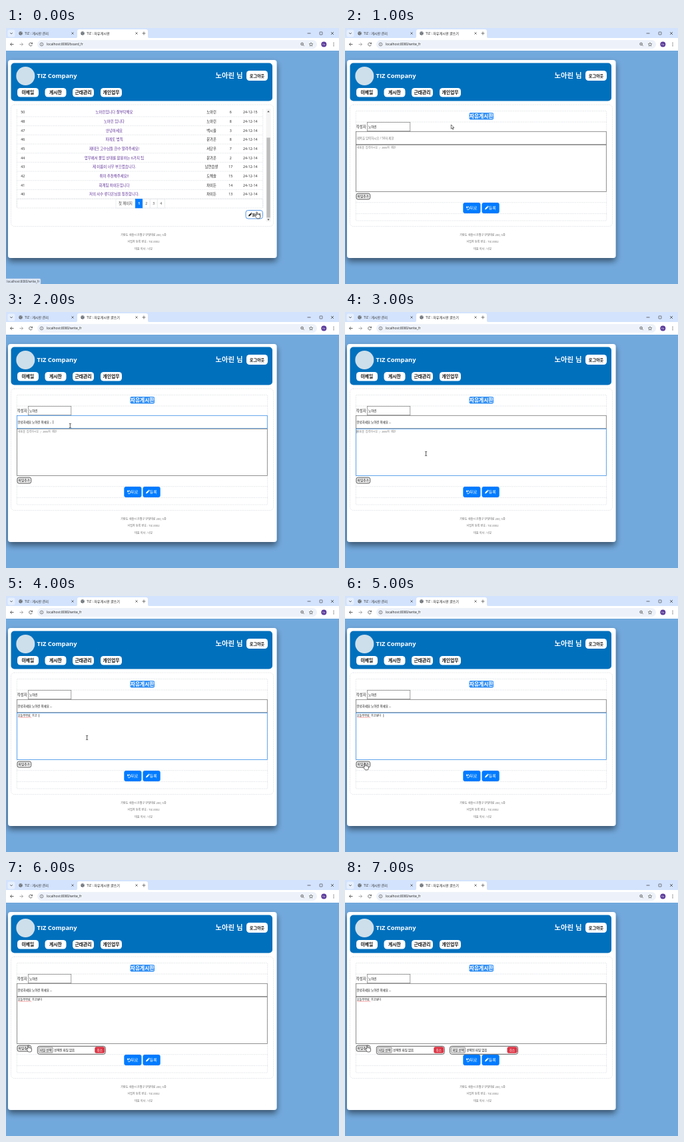
Animation, 500 px wide and 384 px high, one loop 8000 ms. Source, as an HTML page:

```html
<!DOCTYPE html>
<html>
<head>
<meta charset="utf-8">
<title>Board</title>
<style>
html, body { margin: 0; width: 100%; height: 100%; overflow: hidden; background: #72a9dd; }
svg { display: block; width: 500px; height: 384px; }
text { font-family: "Open Sans", "Noto Sans CJK KR", "Noto Sans CJK JP", sans-serif; white-space: pre; }
.mono { font-family: "Noto Sans Mono CJK KR", "Noto Sans CJK KR", "Noto Sans CJK JP", monospace; }
</style>
</head>
<body>
<svg id="stage" viewBox="0 0 500 384" xmlns="http://www.w3.org/2000/svg"></svg>
<script>
const BLUE = '#007bff', INK = '#222', LOOP = 8000;
const USER = '노아린', BRAND = 'TIZ';

const rect = (x, y, w, h, fill, r = 0, extra = '') =>
  `<rect x="${x}" y="${y}" width="${w}" height="${h}" rx="${r}" fill="${fill}" ${extra}/>`;
const line = (d, stroke = '#444', w = .7, extra = '') =>
  `<path d="${d}" fill="none" stroke="${stroke}" stroke-width="${w}" ${extra}/>`;
const circle = (x, y, r, fill, extra = '') =>
  `<circle cx="${x}" cy="${y}" r="${r}" fill="${fill}" ${extra}/>`;
// y is the vertical centre of the glyphs
const text = (x, y, size, str, fill = INK, anchor = 'start', extra = '') =>
  `<text x="${x}" y="${y + size * .37}" font-size="${size}" fill="${fill}" text-anchor="${anchor}" ${extra}>${str}</text>`;
const mid = (x, y, size, str, fill, extra) => text(x, y, size, str, fill, 'middle', extra);
const bold = 'font-weight="700"';
const border = (c, w = .7) => `stroke="${c}" stroke-width="${w}"`;
const group = (id, body) => `<g id="${id}">${body}</g>`;
const dashes = 'stroke-dasharray="1.6 1.1"';
const dashLine = (x1, x2, y) => line(`M${x1} ${y}H${x2}`, '#d2d6da', .6, dashes);
const dashBox = (x, y, w, h, r) => rect(x, y, w, h, 'none', r, border('#d2d6da', .6) + dashes);
const cross = (x, y, s, c = '#444') =>
  line(`M${x - s} ${y - s}l${2 * s} ${2 * s}m0 ${-2 * s}l${-2 * s} ${2 * s}`, c, .7);
const pencil = (x, y, c) =>
  `<path d="M${x} ${y + 5}l.5 -1.9 2.9 -2.9 1.5 1.5 -2.9 2.9zM${x + 3.8} ${y - .2}l.6 -.6 1.5 1.5 -.6 .6z" fill="${c}"/>`;
const globe = (x, y) => circle(x, y, 2.7, '#5f6368') +
  line(`M${x - 2} ${y - .9}q1.6 .2 1.8 1.4t1.6 1.4M${x + .3} ${y - 2.2}q-.2 1.4 1.7 1.5`, '#dfe8f7', .6);

function chrome() {
  return rect(0, 0, 500, 16, '#d3e3fd') +
    rect(2.5, 2.5, 11, 11, '#e6effd', 3) + line('M6.3 7.2l1.7 1.7 1.7 -1.7', '#333', .8) +
    `<path d="M104 15.5q3 0 3 -3V5q0 -3 3 -3H210q3 0 3 3v7.500q0 3 3 3z" fill="#fff"/>` +
    rect(0, 15, 500, 19, '#fff') +
    globe(22, 8) + globe(115, 8) +
    text(28, 8, 5.1, BRAND + ' : 게시판 관리', '#333') +
    group('tab', '') +
    cross(100, 8, 1.6) + cross(196, 8, 1.6) +
    line('M204.500 8h5m-2.500 -2.500v5', '#444', .7) +
    line('M452.500 8h5', '#333') + rect(471, 6, 4, 4, 'none', .4, border('#333', .6)) + cross(490, 8, 2, '#333') +
    line('M11.500 24.500h-5m2.300 -2.300l-2.300 2.300 2.300 2.300', '#444', .8) +
    line('M20.500 24.500h5m-2.300 -2.300l2.300 2.300 -2.300 2.300', '#999', .8) +
    line('M39.200 23.300a2.400 2.400 0 1 0 .1 2.200M39.500 21.800v1.900h-1.900', '#444', .8) +
    rect(47, 18, 420, 13, '#edf2fa', 6.5) +
    circle(53.5, 24.5, 2.4, 'none', border('#444', .6)) + line('M53.500 24.200v1.500m0 -2.900v.6', '#444', .6) +
    group('url', '') +
    circle(444.6, 24, 1.9, 'none', border('#444', .7)) + line('M446 25.400l1.700 1.700M443.700 24h1.800', '#444', .7) +
    line('M458 21.800l.8 1.800 2 .2 -1.500 1.300 .4 2 -1.700 -1 -1.700 1 .4 -2 -1.500 -1.300 2 -.2z', '#444', .6) +
    circle(477.3, 24.5, 4, '#5c3c9c') + mid(477.3, 24.4, 3.4, 'Ha', '#eee') +
    [22.3, 24.5, 26.7].map(y => circle(492, y, .6, '#333')).join('');
}

function header() {
  const tabs = [['이메일', 17], ['게시판', 58.5], ['근태관리', 100], ['개인업무', 142]];
  return rect(3, 48, 403.5, 297, '#fff', 4, 'filter="url(#shade)"') +
    rect(7.5, 52.5, 392.5, 57, '#0070bd', 5) +
    circle(29.3, 72, 14, '#cddfea') +
    text(46.5, 72, 9.3, BRAND + ' Company', '#fff', 'start', bold) +
    text(314.5, 71.5, 10.4, USER + ' 님', '#fff', 'start', bold) +
    rect(361, 64, 32, 15, '#fff', 4.5) + mid(377, 71.5, 6.1, '로그아웃', '#111', bold) +
    tabs.map(([s, x]) => rect(x, 90, 32, 13.5, '#fff', 4.5) + mid(x + 16, 96.7, 6.8, s, '#111', bold)).join('') +
    dashBox(7.5, 115, 394, 182.5, 5) +
    mid(206.5, 310, 4.1, '가람도 새솔시 은별구 한빛대로 200, 5층', '#666') +
    mid(206.5, 320.7, 4.1, '사업자 등록 번호 : ' + BRAND + '-0002', '#666') +
    mid(206.5, 331.7, 4.1, '대표 이사 : 나모', '#666');
}

function board() {
  const rows = [
    [50, USER + '입니다 잘부탁해요', USER, 6],
    [48, USER + ' 입니다', USER, 8],
    [47, '안녕하세요', '백시율', 3],
    [46, '파레토 법칙', '문가온', 8],
    [45, '재테크 고수님들 한수 알려주세요!', '서단우', 7],
    [44, '업무에서 몰입 상태를 활용하는 6가지 팁', '문가온', 2],
    [43, '제 이름이 너무 부끄럽습니다.', '남연습생', 17],
    [42, '취미 추천해주세요!!', '도해솔', 15],
    [41, '회계팀 차이든입니다', '차이든', 14],
    [40, '저의 사수 류다온님을 칭찬합니다.', '차이든', 13]
  ];
  const list = rows.map(([n, title, who, hits], i) => {
    const y = 126.2 + i * 13.67;
    return mid(25.3, y, 5.3, n) + mid(162.5, y, 5.4, title, '#5b2c96') + mid(308.5, y, 5.3, who) +
      mid(337.3, y, 5.3, hits) + mid(366.8, y, 5.3, '24-12-' + (i ? 14 : 15)) + dashLine(16, 386, y + 6.8);
  }).join('');
  const pages = [1, 2, 3, 4].map(n => {
    const x = 183.2 + n * 11, on = n === 1;
    return rect(x, 256.5, 11, 13.5, on ? BLUE : '#fff', 0, border(on ? BLUE : '#dee2e6', .6)) +
      mid(x + 5.5, 263.3, 5.3, n, on ? '#fff' : '#444', on ? bold : '');
  }).join('');
  return line('M16.300 122V270M385.700 122V270', '#d2d6da', .6, dashes) + list +
    dashBox(16.3, 256.5, 369.4, 13.5, 2) +
    rect(165, 256.5, 29.2, 13.5, '#fff', 1, border('#dee2e6', .6)) + mid(179.5, 263.3, 5.3, '첫 페이지', '#444') + pages +
    rect(360, 273.5, 25.500, 12.5, '#fff', 3.5, border('#2f7fe0', .8)) +
    pencil(364, 277.5, '#111') + text(369.5, 279.8, 4.8, '글쓰기', '#111', 'start', bold) +
    rect(390.5, 121.5, 7, 169, '#f4f4f4') + rect(391.3, 164.5, 5.4, 120, '#bcbcbc') +
    `<path d="M392.300 126.300h3.400l-1.700 -2.200zM392.300 286.600h3.400l-1.700 2.200z" fill="#555"/>` +
    rect(-1, 376, 53, 9, '#dfe8f5', 1.5, border('#b9c8dc', .5)) +
    text(1.3, 380, 4.6, 'localhost:8080/write_fr', '#333');
}

function fileRow(id, x) {
  return group(id, rect(x, 249.3, 102, 12, '#fff', 3, border('#333', .8)) +
    rect(x + 2, 251, 21, 8, '#efefef', 1, border('#555', .6)) +
    mid(x + 12.5, 255, 4.5, '파일 선택', '#111') +
    text(x + 25, 255, 4.45, '선택된 파일 없음', '#111') +
    rect(x + 86, 250.3, 15, 9.5, '#dc3545', 2.5) + mid(x + 93.5, 255, 4.6, '취소', '#fff'));
}

function form() {
  return dashBox(16.3, 124.5, 376.4, 164.5, 1) + dashLine(16, 393, 141) + dashLine(16, 393, 261.7) + dashLine(16, 393, 278.500) +
    rect(186.5, 127, 36.5, 10.5, '#3390f5', 2) + mid(204.7, 132.2, 7.8, '자유게시판', '#fff', bold) +
    text(16.8, 148, 5.4, '작성자') +
    rect(33.3, 141.3, 64.5, 13.4, '#fff', 0, border('#777')) + text(35, 148.2, 4.5, USER, '#111') +
    `<rect id="titleBox" x="16.500" y="155.300" width="375.800" height="19.400" fill="#fff" stroke-width=".8"/>` +
    `<rect id="bodyBox" x="16.500" y="175.300" width="375.800" height="70.200" fill="#fff" stroke-width=".8"/>` +
    group('titleText', '') + group('bodyText', '') +
    rect(17, 248.2, 20.7, 8.8, '#efefef', 2.5, border('#333', .8)) + mid(27.3, 252.6, 4.6, '파일추가', '#111') +
    fileRow('file1', 47.3) + fileRow('file2', 157.5) +
    rect(177.3, 262, 26.2, 16, BLUE, 3) + rect(205.5, 262, 26.2, 16, BLUE, 3) +
    line('M182.500 267.500v2.200h2.200M182.700 269.400a2.300 2.300 0 1 1 .2 2.100', '#fff', .9) +
    text(187.4, 269.8, 6.1, '뒤로', '#fff') +
    pencil(210, 267.4, '#fff') + text(215.7, 269.8, 6.1, '등록', '#fff');
}

const cursors = {
  arrow: '<path d="M0 0v6.300l1.500 -1.400 1 2.300 1 -.4 -1 -2.300h2z" fill="#fff" stroke="#111" stroke-width=".6"/>',
  beam: line('M-1.500 -3.200q1.500 0 1.500 .7q0 -.7 1.500 -.7M0 -2.500v5M-1.500 3.200q1.500 0 1.500 -.7q0 .7 1.500 .7', '#111', .7),
  hand: '<path d="M-.8 .6q0 -.8 .8 -.8t.8 .8v2.900q1.300 -.5 1.500 .2q1.200 -.4 1.500 .4q1.300 -.2 1.300 1v2.300q0 2.200 -2 2.200h-2.200q-1 0 -1.700 -1.200l-2 -3q-.3 -.8 .4 -1t1.600 .9z" fill="#fff" stroke="#111" stroke-width=".65"/>'
};

const GREETING = `안녕하세요 ${USER} 이에요 ..`;
const typed = (s, caret) => text(17.8, 179.3, 4.15, s, '#111', 'start', 'class="mono"') +
  line('M18 182q.5 -1 1 0t1 0 1 0 1 0 1 0 1 0 1 0 1 0 1 0 1 0 1 0 1 0 1 0 1 0 1 0 1 0 1 0 1 0 1 0 1 0', '#e33', .5) +
  (caret ? line(`M${caret} 177v4.800`, '#111', .5) : '');
const hint = text(17.8, 179.2, 4, '내용을 입력하시오 / 2000자 제한', '#777', 'start', 'class="mono"');
const POST = '오늘부부로 가고싶다';

// one entry per second
const steps = [
  { cursor: ['hand', 376.6, 276.2] },
  { cursor: ['arrow', 159.3, 145] },
  { cursor: ['beam', 96.3, 170.5], title: GREETING, focus: 'title' },
  { cursor: ['beam', 121.6, 212.5], title: GREETING + '.', focus: 'body', body: hint + line('M18 177v4.800', '#111', .5) },
  { cursor: ['beam', 121.6, 212.5], title: GREETING + '.', focus: 'body', body: typed(POST.slice(0, 8), 49.5) },
  { cursor: ['hand', 30.2, 251.3], title: GREETING + '.', focus: 'body', body: typed(POST, 57.8) },
  { cursor: ['hand', 33.4, 248.3], title: GREETING + '.', body: typed(POST), files: 1 },
  { cursor: ['hand', 33.4, 248.3], title: GREETING + '.', body: typed(POST), files: 2 }
];

const $ = id => document.getElementById(id);
$('stage').innerHTML =
  `<defs><filter id="shade" x="-10%" y="-10%" width="120%" height="125%">
    <feDropShadow dx="0" dy="5" stdDeviation="5" flood-color="#000" flood-opacity=".5"/></filter></defs>` +
  rect(0, 0, 500, 384, '#72a9dd') + header() + chrome() +
  group('board', board()) + group('form', form()) + group('cursor', '');

const show = (id, on) => $(id).setAttribute('display', on ? 'inline' : 'none');
const outline = (id, on) => $(id).setAttribute('stroke', on ? '#3a8ee6' : '#777');
let current = -1;

function draw(ms) {
  const n = Math.floor(ms % LOOP / 1000);
  if (n === current) return;
  current = n;
  const s = steps[n], writing = n > 0;
  show('board', !writing);
  show('form', writing);
  $('tab').innerHTML = text(121, 8, 5.1, BRAND + ' : 자유게시판' + (writing ? ' 글쓰기' : ''), '#222');
  $('url').innerHTML = text(61, 24.4, 4.95, 'localhost:8080/' + (writing ? 'write_fr' : 'board_fr'), '#222');
  $('titleText').innerHTML = s.title
    ? text(17.5, 165.2, 4.45, s.title, '#111') + (s.focus === 'title' ? line('M70.700 162.600v5.200', '#111', .5) : '')
    : text(17.8, 165, 4.4, '제목을 입력하시오 / 50자 제한', '#777');
  $('bodyText').innerHTML = s.body || hint;
  outline('titleBox', s.focus === 'title');
  outline('bodyBox', s.focus === 'body');
  show('file1', s.files >= 1);
  show('file2', s.files >= 2);
  const [kind, x, y] = s.cursor;
  $('cursor').innerHTML = cursors[kind];
  $('cursor').setAttribute('transform', `translate(${x} ${y})`);
}

const start = performance.now();
function tick() {
  draw(performance.now() - start);
  requestAnimationFrame(tick);
}
tick();
</script>
</body>
</html>
```
